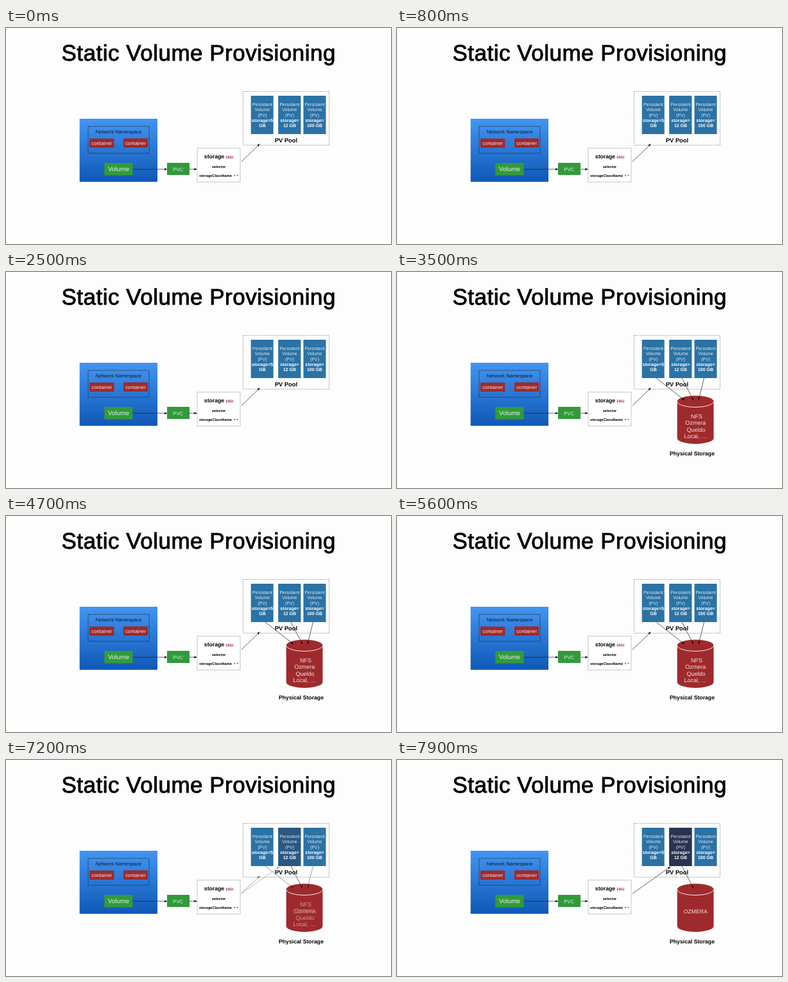
Recreate the animation shown at these times as an HTML page. Size 600 px wide and 338 px high, loop 8 s.

```html
<!DOCTYPE html>
<html lang="en">
<head>
<meta charset="utf-8">
<title>Static Volume Provisioning</title>
<style>
  html, body { margin: 0; width: 100%; height: 100%; overflow: hidden; background: #fdfdfd; }
  svg { display: block; width: 100vw; height: 100vh; }
  text { font-family: "Liberation Sans", Arial, sans-serif; text-anchor: middle; text-rendering: geometricPrecision; }
  .title { font-size: 35px; letter-spacing: .5px; stroke: #000; stroke-width: .9; }
  .b { font-weight: bold; }
  .w { fill: #fff; fill-opacity: .86; }
  .w.b { fill-opacity: 1; }
  .t7 { font-size: 7px; }
  .t5 { font-size: 5.65px; }
  .t8 { font-size: 8.7px; }
  .red { fill: #9f2a2d; }
  .green { fill: #329a3c; }
  .blue { fill: #2b72a5; }
  .line { fill: none; stroke: #222; stroke-width: .7; }
  .arrow { marker-end: url(#head); }

  /* storage fades in, then the binding replaces the general links */
  .storage, .general, .bound, .search { animation: 8s linear infinite; }
  .storage { animation-name: appear; }
  .general, .search { animation-name: leave; }
  .bound { animation-name: bind; }
  @keyframes appear { 0%, 36.25% { opacity: 0; } 40%, 100% { opacity: 1; } }
  @keyframes leave { 0%, 88% { opacity: 1; } 93%, 100% { opacity: 0; } }
  @keyframes bind { 0%, 88% { opacity: 0; } 93%, 100% { opacity: 1; } }
</style>
</head>
<body>
<svg viewBox="0 0 600 338">
  <defs>
    <linearGradient id="pod" x2="0" y2="1">
      <stop stop-color="#4395f2"/>
      <stop offset="1" stop-color="#0f58b6"/>
    </linearGradient>
    <marker id="head" markerUnits="userSpaceOnUse" markerWidth="5" markerHeight="5" refX="4.2" refY="2.2" orient="auto">
      <path d="M0 .4L4.4 2.2L0 4z" fill="#111"/>
    </marker>
  </defs>

  <text x="300.2" y="50.8" class="title">Static Volume Provisioning</text>

  <!-- pod -->
  <rect x="114.7" y="142" width="121.3" height="98.7" fill="url(#pod)"/>
  <rect x="128" y="154" width="95" height="42" class="line" stroke-opacity=".75"/>
  <text x="175.5" y="165" font-size="7.7" fill="#0c1a30">Network Namespace</text>
  <g font-size="7.8">
    <rect x="130" y="173" width="38.3" height="14.3" class="red"/>
    <text x="149.3" y="183" class="w">container</text>
    <rect x="183" y="172.7" width="38" height="14.3" class="red"/>
    <text x="202" y="182.7" class="w">container</text>
  </g>
  <rect x="153.3" y="211.2" width="44.2" height="19.3" class="green"/>
  <text x="175.5" y="224.3" font-size="9.9" class="w">Volume</text>

  <!-- claim -->
  <rect x="251" y="211" width="35" height="19" class="green"/>
  <text x="268.2" y="223.7" font-size="7.7" class="w">PVC</text>
  <rect x="298" y="188" width="67" height="53" fill="#fff" stroke="#aaa" stroke-width=".7"/>
  <g class="b">
    <text x="324.5" y="204.3" class="t8">storage</text>
    <g class="t5">
      <text x="348.2" y="204.3" fill="#8e2024">10Gi</text>
      <text x="331.5" y="219">selector</text>
      <text x="326.5" y="233">storageClassName</text>
    </g>
    <text x="358.3" y="233.6" font-size="6">“ ”</text>
  </g>
  <path class="line arrow" d="M197.5 221H251"/>
  <path class="line arrow" d="M286 221H297.5"/>

  <!-- pool -->
  <rect x="369.5" y="99.3" width="134" height="84" class="line" stroke-opacity=".7" stroke-dasharray="1.5 1.5"/>
  <g class="blue">
    <rect x="381.7" y="106" width="35" height="60"/>
    <rect x="424.2" y="106" width="35.3" height="60"/>
    <rect x="463.5" y="106" width="35" height="60"/>
  </g>
  <rect x="424.2" y="106" width="35.3" height="60" fill="#2a3351" class="bound"/>
  <g id="volumes"></g>
  <text x="436.5" y="178.7" font-size="9.3" class="b">PV Pool</text>
  <path class="line arrow search" d="M367 209L395.5 181.5"/>
  <path class="line arrow bound" d="M367 209L426 167"/>

  <!-- physical storage -->
  <g class="storage">
    <path class="red" d="M436.7 202.5a28.4 9 0 0 1 56.8 0V260a28.4 9 0 0 1-56.8 0z"/>
    <path d="M436.7 202.5a28.4 9 0 0 0 56.8 0" fill="none" stroke="#fff" stroke-width=".9"/>
    <g class="general">
      <g font-size="9" class="w">
        <text x="467" y="228.7">NFS</text>
        <text x="465.3" y="239.2">Ozmera</text>
        <text x="466" y="249.7">Queldo</text>
        <text x="465.3" y="260.2">Local, …</text>
      </g>
      <path class="line arrow" d="M404 166L448 200.5"/>
      <path class="line arrow" d="M478.5 166L470 200.5"/>
    </g>
    <path class="line arrow" d="M444 166L462 200.5"/>
    <text x="465.3" y="239.8" font-size="8.65" class="w bound">OZMERA</text>
    <text x="460" y="287" class="b t8">Physical Storage</text>
  </g>
</svg>
<script>
  const volumes = [[399.5, "storage=5", "GB"], [442, "storage=", "12 GB"], [481, "storage=", "100 GB"]];
  document.getElementById("volumes").innerHTML = volumes.map(([x, ...size]) =>
    ["Persistent", "Volume", "(PV)", ...size].map((line, i) =>
      `<text class="w t7 ${i > 2 ? "b" : ""}" x="${x}" y="${122.2 + i * 8.2}">${line}</text>`
    ).join("")
  ).join("");
</script>
</body>
</html>
```
